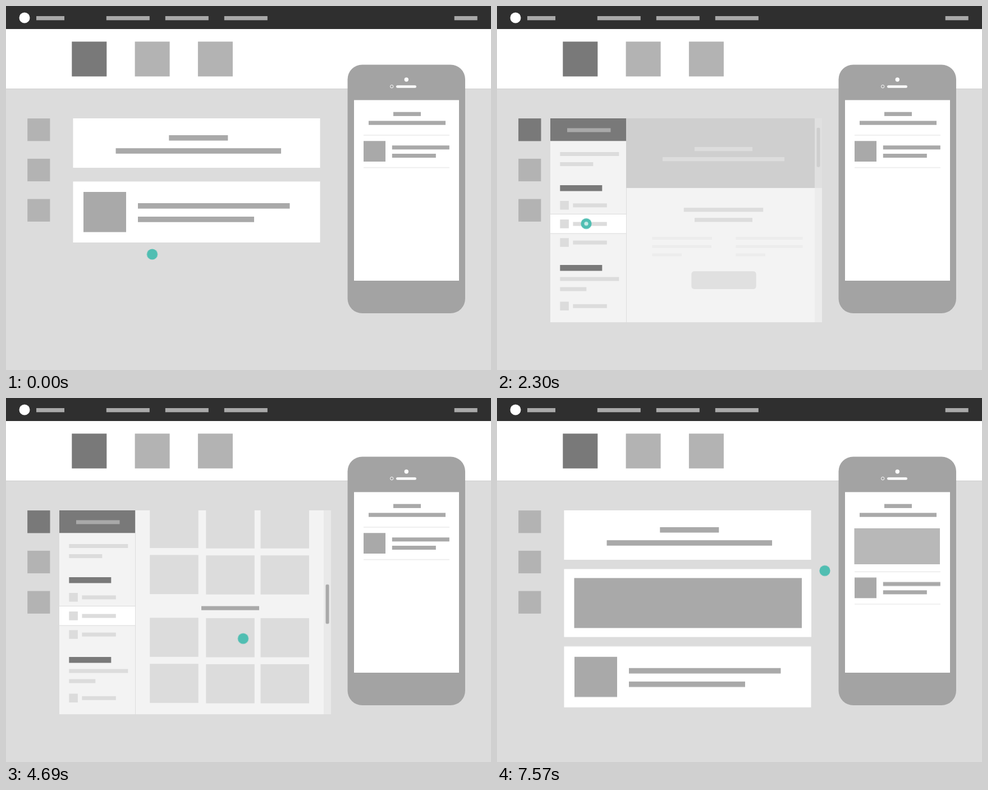
An HTML page that plays this animation: 864 by 648 pixels, repeating every 8.17 s.

```html
<!DOCTYPE html>
<html lang="en">
<head>
<meta charset="utf-8">
<title>Page builder wireframe</title>
<style>
  html, body { margin: 0; width: 100%; height: 100%; overflow: hidden; background: #dcdcdc; }
  svg { display: block; width: 100vw; height: 100vh; }
</style>
</head>
<body>
<svg id="stage" viewBox="0 0 864 648">
  <defs>
    <clipPath id="view"><rect x="230.5" y="196" width="335.5" height="363"/></clipPath>
  </defs>
</svg>
<script>
const LOOP = 8170;
const DARK = '#797979', MID = '#a9a9a9', SOFT = '#b3b3b3', PALE = '#dcdcdc', PANEL = '#f3f3f3', TEAL = '#50beb2';
const stage = document.getElementById('stage');

function el(parent, tag, attrs = {}) {
  const node = document.createElementNS('http://www.w3.org/2000/svg', tag);
  for (const key in attrs) node.setAttribute(key, attrs[key]);
  return parent.appendChild(node);
}
const group = (parent, attrs) => el(parent, 'g', attrs);
const rect = (parent, x, y, width, height, fill, rx = 0) =>
  el(parent, 'rect', { x, y, width, height, fill, rx });
const square = (parent, x, y, size, fill) => rect(parent, x, y, size, size, fill);
const circle = (parent, cx, cy, r, fill) => el(parent, 'circle', { cx, cy, r, fill });
const ring = (parent, cx, cy, r, stroke, width, fill = 'none') =>
  el(parent, 'circle', { cx, cy, r, fill, stroke, 'stroke-width': width });
const repeat = (count, draw) => { for (let i = 0; i < count; i++) draw(i); };

// Stacked lines of dummy text, left aligned or centred
const lines = (parent, x, y, gap, widths, height = 7, fill = MID) =>
  widths.forEach((w, i) => rect(parent, x, y + i * gap, w, height, fill));
const centred = (parent, cx, y, gap, widths, height = 7.2) =>
  widths.forEach((w, i) => rect(parent, cx - w / 2, y + i * gap, w, height, MID));

function play(node, prop, steps) {
  const frames = [{ ...steps[0], t: 0 }, ...steps, { ...steps[steps.length - 1], t: LOOP }];
  node.animate(
    frames.map(({ t, value, easing = 'linear' }) => ({ offset: t / LOOP, [prop]: value, easing })),
    { duration: LOOP, iterations: Infinity });
}

// Switches opacity between 0 and 1 at each time, taking len ms
function fade(node, opacity, len, ...times) {
  const steps = [];
  for (const t of times) {
    steps.push({ t, value: opacity });
    opacity = 1 - opacity;
    steps.push({ t: t + len, value: opacity });
  }
  play(node, 'opacity', steps);
}

const at = (x, y) => `translate(${x}px, ${y}px)`;
function slide(node, start, end, from, to, easing = 'ease-in-out') {
  play(node, 'transform', [
    { t: start, value: at(0, from), easing },
    { t: end, value: at(0, to) }]);
}

// Visits [arrive, leave, x, y] in turn
function travel(node, stops, easing) {
  play(node, 'transform', stops.flatMap(([arrive, leave, x, y, ease = easing]) => [
    { t: arrive, value: at(x, y) },
    { t: leave, value: at(x, y), easing: ease }]));
}

// Page frame
rect(stage, 0, 41, 864, 106, '#fff');
rect(stage, 0, 147, 864, 1, '#d0d0d0');
rect(stage, 0, 0, 864, 41, '#2f2f2f');
circle(stage, 33, 21, 9.5, '#fff');
rect(stage, 54, 18, 50, 7.3, MID);
repeat(3, i => rect(stage, 178.8 + i * 105, 18, 77, 7.3, MID));
rect(stage, 798.7, 18, 41, 7.3, MID);
repeat(3, i => square(stage, 117.3 + i * 112.3, 63.4, 62, i ? SOFT : DARK));
repeat(3, i => square(stage, 38.2, 200.2 + i * 71.7, 40.2, SOFT));
fade(square(stage, 38.2, 200.2, 40.2, DARK), 0, 280, 640, 5640);

// Cards
const cards = group(stage);
fade(cards, 1, 300, 720, 5830);
rect(cards, 119.5, 200, 440, 88, '#fff');
centred(cards, 342.8, 230, 23.2, [105, 294.5], 9.6);

const added = group(cards);
rect(added, 119.5, 304.5, 440.5, 121, '#fff');
rect(added, 137.5, 320.5, 405.5, 89, MID);
fade(added, 0, 200, 7000);

const item = group(cards);
rect(item, 119.5, 312.5, 440, 108.5, '#fff');
rect(item, 138, 331, 76, 71.5, MID);
lines(item, 235, 351, 24, [270.5, 207], 9.7);
slide(item, 6960, 7200, 0, 129.7);

// Insert lines with their plus buttons
function insertLine(parent, x, y, r) {
  rect(parent, x, y - 1.5, 440, 3, '#fff');
  const button = group(parent);
  const cx = x + 448 + r;
  ring(button, cx, y, r - 1.2, '#fff', 2.4, PALE);
  circle(button, cx, y, r - 4, '#c8c8c8');
  rect(button, cx - 1.8, y - 5, 3.6, 10, '#fff');
  rect(button, cx - 5, y - 1.8, 10, 3.6, '#fff');
  return button;
}
const lower = group(group(stage, { opacity: .25 }));
insertLine(lower, 117.5, 437.3, 10.5).setAttribute('transform', 'translate(7.5 0)');
fade(lower, 0, 130, 6460, 6890);

const upper = group(stage);
insertLine(upper, 119.5, 299.8, 12.5).style.filter = 'drop-shadow(0 0 2px rgba(0,0,0,.3))';
fade(upper, 0, 130, 6460, 6910);

// Builder panel
const panel = group(stage);
fade(panel, 0, 330, 760, 5620);
rect(panel, 95, 200, 484, 363, PANEL);
rect(panel, 230, 200, 1, 363, '#dedede');
rect(panel, 95, 200, 135, 40.3, DARK);
rect(panel, 125, 217.5, 77.5, 7, MID);
lines(panel, 112.3, 260, 18, [105, 59], 7, PALE);
lines(panel, 112.3, 482.5, 18, [105, 47], 7, PALE);
lines(panel, 112.3, 319, 142, [75, 75], 10.5, DARK);

const picked = group(panel);
rect(picked, 95, 370, 135, 35.5, PALE);
rect(picked, 95, 371, 135, 33.5, '#fff');
fade(picked, 0, 160, 2040);

function option(parent, y, fill) {
  square(parent, 112.3, y, 15.6, fill);
  rect(parent, 135.4, y + 4.4, 60.4, 7, fill);
}
repeat(3, i => option(panel, 347 + i * 33.1, PALE));
option(panel, 526.4, PALE);
const hover = group(panel);
option(hover, 380.1, '#979797');
fade(hover, 0, 150, 1560, 2020);

// First view of the panel
const intro = group(panel);
fade(intro, 0, 282, 900, 2100);
rect(intro, 230.5, 200, 348.5, 124, DARK);
centred(intro, 403.5, 251, 18, [103, 217]);
centred(intro, 403.5, 359.2, 18, [141.5, 103]);
lines(intro, 276.5, 411, 14.7, [106.5, 105.5, 52.5], 5, PALE);
lines(intro, 425.5, 411, 14.7, [119, 119, 52.5], 5, PALE);
rect(intro, 346.4, 472.2, 115.3, 31.8, SOFT, 5);

// Scrolling gallery
const DRAG = [3580, 4060], GRIP = 115.2;
const gallery = group(panel, { 'clip-path': 'url(#view)' });
const list = group(gallery);
fade(gallery, 0, 320, 2400);
slide(list, ...DRAG, 5.6, -84, 'linear');
centred(list, 399.5, 230.5, 18, [103, 217]);
centred(list, 399.5, 454.5, 0, [103]);
const shadow = rect(list, 356.3, 480, 86.5, 69, 'rgba(0,0,0,.3)');
shadow.style.filter = 'blur(1.5px)';
fade(shadow, 0, 110, 5200);
repeat(4, row => [256.2, 356.3, 453.5].forEach((x, col) =>
  rect(list, x, 281.5 + row * 82 + (row > 1 ? 29.7 : 0) + (col ? .7 : 0), 86.5, 69.6, PALE)));

fade(rect(panel, 566, 200, 13, 363, '#e9e9e9'), 0, 300, 2100);
const thumb = rect(panel, 569.5, 216.8, 6, 70, MID, 2);
fade(thumb, 0, 260, 2220);
slide(thumb, ...DRAG, 0, GRIP, 'linear');

// Phone
rect(stage, 608.5, 104.5, 209.5, 442.5, '#a3a3a3', 26);
circle(stage, 713.3, 131, 3.7, '#fff');
ring(stage, 687.2, 143.3, 2.7, '#fff', 1);
rect(stage, 695, 141.2, 36, 4.6, '#fff', 2.3);
rect(stage, 620, 167.5, 187, 321.5, '#fff');
centred(stage, 714.5, 188.7, 15.8, [49, 137]);
fade(rect(stage, 636.5, 232, 152.5, 64, '#b8b8b8'), 0, 190, 7370);
const entry = group(stage);
lines(entry, 637, 229, 57.7, [153, 153], 2, '#efefef');
rect(entry, 637, 240.3, 39, 36.7, MID);
lines(entry, 687.8, 248.3, 14.7, [102, 78], 7.1);
slide(entry, 7270, 7500, 0, 79.3);

// Pointer
const pointer = group(stage);
fade(ring(pointer, 0, 0, 10.4, '#f3f3f3', 1.4), 0, 90, 3380, 4330);
circle(pointer, 0, 0, 9.6, TEAL);
const presses = [[620, 780], [1980, 2270], [3380, 4330], [5220, 5370], [6720, 6850]];
fade(circle(pointer, 0, 0, 3.6, '#fff'), 0, 100, ...presses.flat());
travel(pointer, [
  [0, 20, 260.5, 442],
  [620, 1020, 58, 220],
  [1650, 2590, 159, 387.5],
  [3410, DRAG[0], 573.5, 255.5, 'linear'],
  [DRAG[1], 4310, 573.5, 255.5 + GRIP],
  [4690, 5680, 422.5, 428.3],
  [6410, LOOP, 584, 307.5]
], 'ease-in-out');
</script>
</body>
</html>
```
